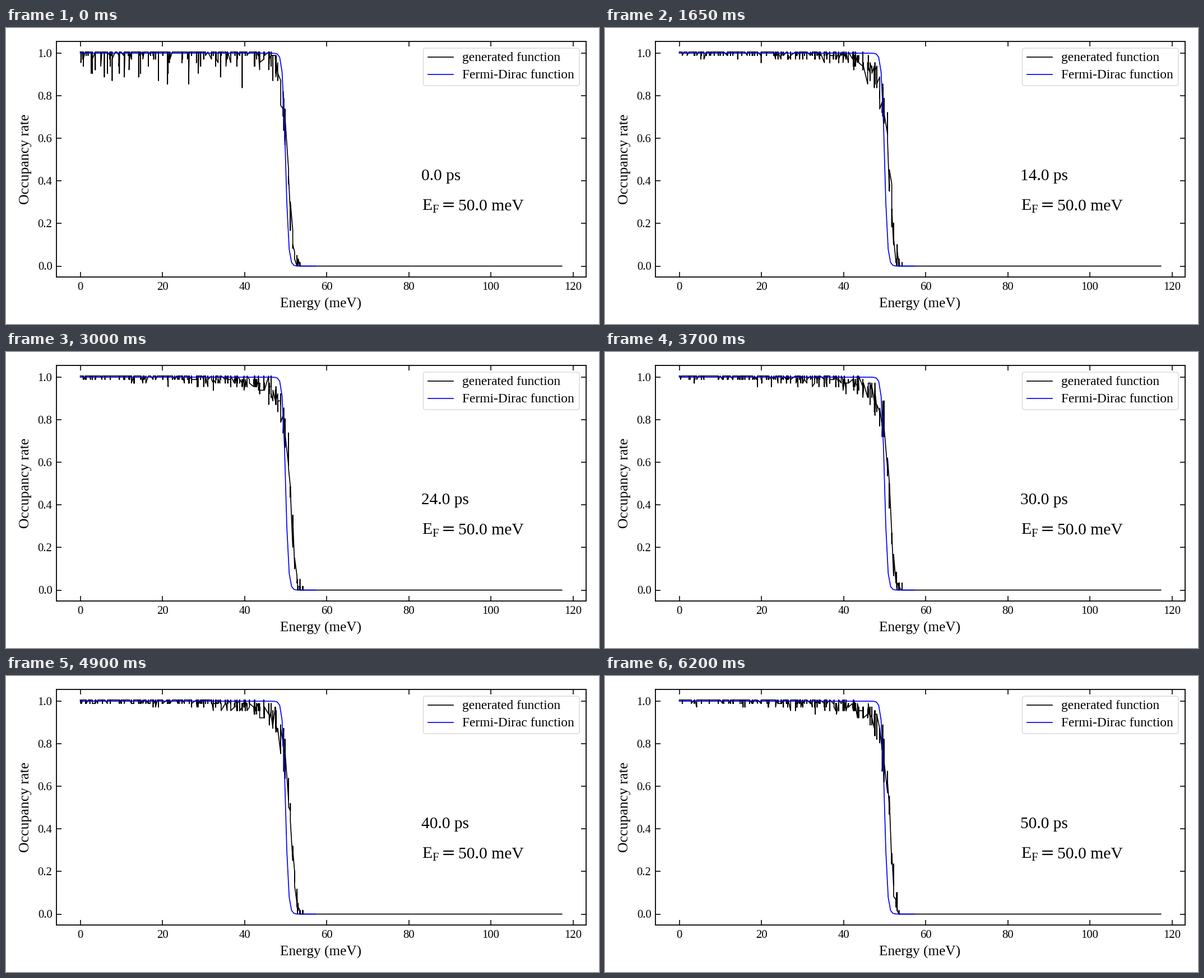
A matplotlib script for the animation above (6.25 s loop, 1058 by 529 pixels).

```python
import numpy as np
import matplotlib.pyplot as plt
from matplotlib.animation import FuncAnimation
from matplotlib.patches import FancyBboxPatch

W, H, DPI = 1058, 529, 64
PT = 72 / DPI                      # points per pixel
FRAMES, STEP_MS = 125, 50
E_F, KT = 50.0, 0.362              # meV
SLOTS, FULL = 60, 1.0058           # carriers per state, height of a full state

plt.rcParams.update({
    "font.family": "Liberation Serif",
    "mathtext.fontset": "custom",
    "mathtext.rm": "Liberation Serif",
    "path.simplify": False,
})

# Plot area in pixels and the data scale inside it
LEFT, RIGHT, TOP, BOTTOM = 89.6, 1034.7, 23.7, 444.6
X0, Y0, SX, SY = 132.5, 425.5, 7.325, 380.5


def px(energy):
    return X0 + SX * np.asarray(energy)


def py(rate):
    return Y0 - SY * np.asarray(rate)


# Energies of a half-plane lattice of wave vectors, with degenerate levels
N, E_MAX = 20, 117.3
i, j = np.meshgrid(np.arange(-N, N + 1), np.arange(N + 1))
energy = np.sort((i**2 + j**2).ravel()) * E_MAX / (2 * N**2)


def occupancy(middle, shoulder):
    """Soft step; a shoulder makes it approach 1 slowly on the low side."""
    above = np.maximum(energy - middle, 0)
    below = np.maximum(middle - energy, 0)
    rise = 1.65 * np.log1p(0.8 * below) if shoulder else below
    return 1 / (1 + np.exp(above + 0.36 * above**2 - rise))


def simulate():
    """Occupancy of every state per frame; some states change each step."""
    rng = np.random.default_rng(12)
    size = energy.size
    hit = (rng.random(size) < 0.2) & (energy < 47)
    dips = np.where(hit, np.ceil(rng.exponential(2.1, size)), 0)
    count = rng.binomial(SLOTS, occupancy(50.5, False)) - dips
    settled = occupancy(51, True)
    rows = [count]
    for _ in range(FRAMES - 1):
        fresh = rng.binomial(SLOTS, settled)
        count = np.where(rng.random(size) < 0.5, fresh, count)
        rows.append(count)
    return np.clip(rows, 0, SLOTS) / SLOTS * FULL


rates = simulate()

fig = plt.figure(figsize=(W / DPI, H / DPI), dpi=DPI, facecolor="white")
ax = fig.add_axes([0, 0, 1, 1])
ax.set_xlim(0, W)
ax.set_ylim(H, 0)
ax.axis("off")


def line(xs, ys, color="black", width=1.7, **kw):
    return ax.plot(xs, ys, color=color, lw=width * PT, **kw)[0]


def label(x, y, text, size, **kw):
    return ax.text(x, y, text, fontsize=size * PT, va="baseline", **kw)


# Curves
curve = line(px(energy), py(rates[0]), solid_joinstyle="round")
grid = np.linspace(0, 57.25, 100)
line(px(grid), py(1 / (np.exp((grid - E_F) / KT) + 1)), "blue")

# Frame, ticks and tick labels
line([LEFT, RIGHT, RIGHT, LEFT, LEFT], [TOP, TOP, BOTTOM, BOTTOM, TOP],
     width=1.8, solid_joinstyle="miter")
TICK = 9
for value in range(0, 121, 20):
    x = px(value)
    for start, end in ((BOTTOM, BOTTOM - TICK), (TOP, TOP + TICK)):
        line([x, x], [start, end], width=1.6, solid_capstyle="butt")
    label(x, 468, str(value), 20.8, ha="center")
for value in np.arange(6) / 5:
    y = py(value)
    for start, end in ((LEFT, LEFT + TICK), (RIGHT, RIGHT - TICK)):
        line([start, end], [y, y], width=1.6, solid_capstyle="butt")
    label(82.5, y + 7, f"{value:.1f}", 20.8, ha="right")

label(562, 500, "Energy (meV)", 25.2, ha="center")
label(41, 234.2, "Occupancy rate", 25.8, ha="center", rotation=90,
      rotation_mode="anchor")

# Legend
ax.add_patch(FancyBboxPatch(
    (748.5, 40), 270.5, 59, boxstyle="round,pad=4,rounding_size=4",
    facecolor="white", edgecolor="#d5d5d5", lw=1.3 * PT, zorder=3))
for y, color, name in ((52, "black", "generated function"),
                       (83, "blue", "Fermi-Dirac function")):
    line([752.5, 798], [y, y], color, zorder=4)
    label(814.5, y + 7, name, 23.4, zorder=4)

# Clock and Fermi energy
clock = label(741, 272, "0.0 ps", 29.4)
label(741.5, 325.5, r"E$_\mathrm{F}$", 29.6)
label(777, 325.5, "=", 30, family="DejaVu Serif")
label(807, 325.5, f"{E_F:.1f} meV", 29.6)


def update(k):
    curve.set_ydata(py(rates[k]))
    clock.set_text(f"{(2 * k + 4) // 5:.1f} ps")
    return curve, clock


anim = FuncAnimation(fig, update, frames=FRAMES, interval=STEP_MS,
                     repeat=True, repeat_delay=0)
plt.show()
```
